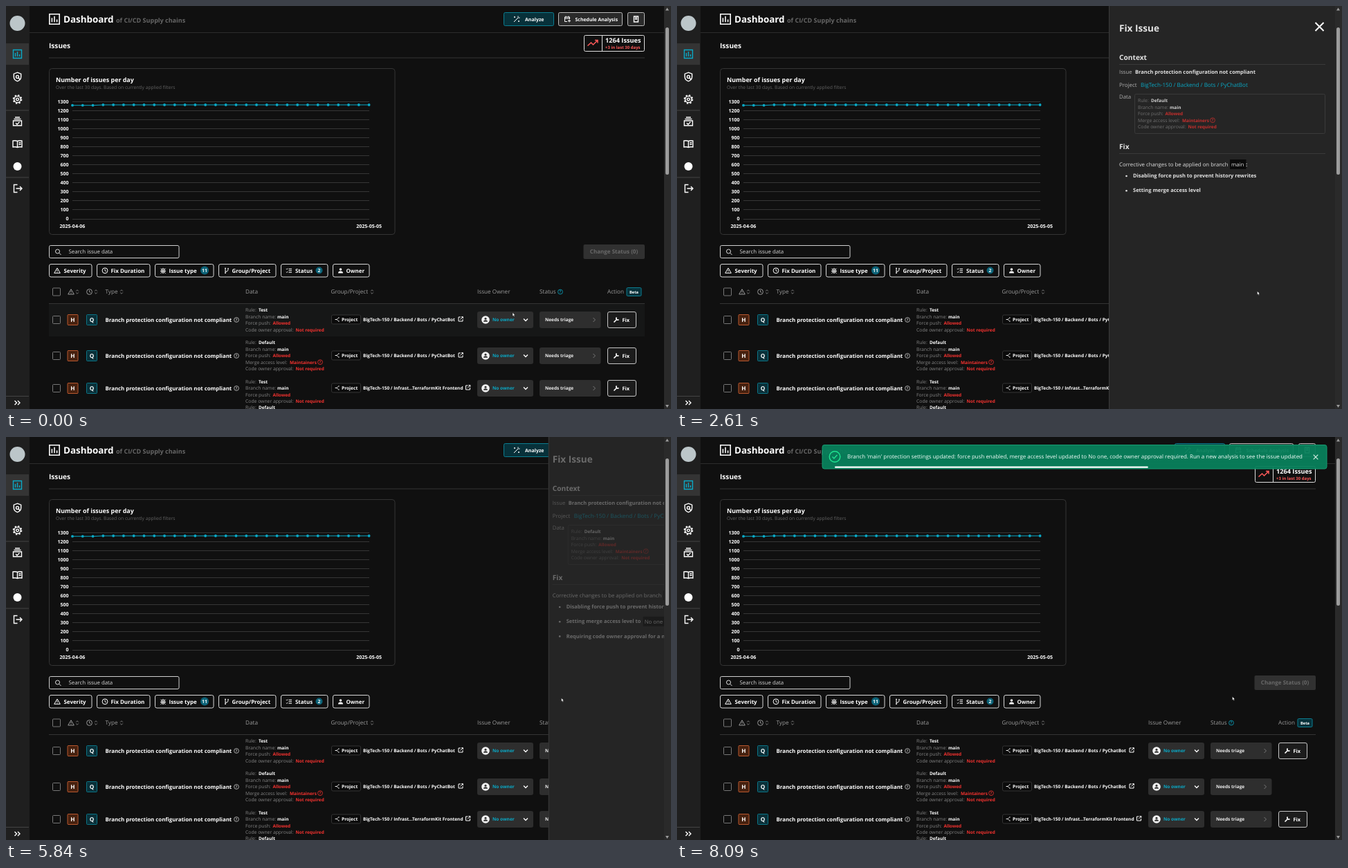
These frames come from a looping animation (961x583 px, 8.17 s). An HTML page:

```html
<!DOCTYPE html>
<html lang="en">
<head>
<meta charset="utf-8">
<title>Issue dashboard</title>
<style>
html, body { margin: 0; height: 100%; overflow: hidden; background: #101010; }
svg { display: block; width: 961px; height: 583px; font-family: "Open Sans", "Noto Sans", sans-serif; text-rendering: geometricPrecision; }
</style>
</head>
<body>
<svg id="stage" viewBox="0 0 961 583"></svg>
<script>
const TEAL = '#0aa9c6', RED = '#f3322f', GREY = '#858585', LINE = '#343434';

// Drawing helpers; text is centred vertically on y by its cap height.
const text = (x, y, s, size = 7, fill = '#fff', weight = 700, anchor = 'start', extra = '') =>
  `<text x="${x}" y="${y + size * .36}" font-size="${size}" fill="${fill}" font-weight="${weight}" text-anchor="${anchor}" ${extra}>${s}</text>`;
const rect = (x, y, w, h, fill = 'none', stroke = 'none', r = 0, extra = '') =>
  `<rect x="${x}" y="${y}" width="${w}" height="${h}" rx="${r}" fill="${fill}" stroke="${stroke}" ${extra}/>`;
const dot = (x, y, r, fill, extra = '') => `<circle cx="${x}" cy="${y}" r="${r}" fill="${fill}" ${extra}/>`;
const path = (d, stroke, width = 1, extra = '') => `<path d="${d}" stroke="${stroke}" stroke-width="${width}" fill="none" ${extra}/>`;
const hline = (x1, x2, y, color = LINE) => path(`M${x1} ${y}H${x2}`, color);
const group = (id, content, extra = '') => `<g id="${id}" ${extra}>${content}</g>`;
const ring = r => `M${-r} 0a${r} ${r} 0 1 0 ${2 * r} 0a${r} ${r} 0 1 0 ${-2 * r} 0`;

const shapes = {
  chart: 'M-6-6H6V6H-6ZM-3 3.5v-5M0 3.5v-7M3 3.5v-3',
  shield: 'M0-6.3L5.2-4.3V0C5.2 3.3 3 5.3 0 6.3C-3 5.3-5.2 3.3-5.2 0V-4.3Z' + ring(2) + 'M1.4 1.4l2 2',
  gear: ring(4.6) + ring(1.9),
  tasks: 'M-3.5-6h7M-5-3.5h10M-6-1H6V6H-6ZM-2.5 2.3l2 2 3.5-3.5',
  book: 'M0-4C-2-5-4-5-6.5-4.5V4.5C-4 4-2 4 0 5C2 4 4 4 6.5 4.5V-4.5C4-5 2-5 0-4V5M2-1.5l3-.5M2 1l3-.5',
  logout: 'M0-5.5h-5v11h5M-2 0h8M3.5-3l3 3-3 3',
  expand: 'M-4-3l3 3-3 3M.5-3l3 3-3 3',
  wand: 'M-4 4l6-6M2-4.5v2M4.5-2h-2M-3-4v2M-4-3h2M3 2v2M2 3h2',
  calendar: 'M-3.5-3h7v3M-3.5-3v6.5h3.500M-3.500-1h7M-2-4.500v2M2-4.500v2M1 2.500h4M3 .5v4',
  note: 'M-3-4h6v8h-6ZM-1.500-2h3M-1.500 0h3',
  search: 'M-4-1a3 3 0 1 0 6 0a3 3 0 1 0-6 0M1.2 1.2L4 4',
  warn: 'M0-3.8L4.3 3.5H-4.300ZM0-1.200v2M0 1.800v.8',
  clock: ring(3.9) + 'M0-2.300V0l1.800 1',
  bug: 'M-2-1a2 2 0 0 1 4 0v2.500a2 2 0 0 1-4 0ZM-4 .7h8M-3.500-3l1.500 1.500M3.500-3l-1.500 1.500M-3.500 4l1.500-1.500M3.500 4l-1.500-1.500M0-2v5',
  branch: 'M-2-3.500v7M-2 1.500c3 0 4-1 4-4M-3-3.500h2M-3 3.500h2M1-3h2',
  list: 'M-4-2.500l.8.8 1.200-1.500M-4 2l.8.8 1.200-1.500M-.5-2.500h4.500M-.5 0h4.500M-.5 2.500h4.500',
  sort: 'M-1.800-1L0-2.800 1.800-1M-1.800 1L0 2.800 1.800 1',
  link: 'M0-3h-3v6h6v-3M-.5.5L3.300-3.300M1-3.300h2.300v2.300',
  down: 'M-3-1.500L0 1.500 3-1.500',
  right: 'M-1.500-3L1.500 0-1.500 3',
  wrench: 'M-3.500 3.500L1-1M.5-3.500a2 2 0 1 0 3 3',
  nodes: 'M-2.500 0h2l2-2M-.5 0l2 2M-3.200 0h.4M1.600-2.500h1.500M1.600 2.500h1.500',
  trend: 'M-7.500 3.500l5-4.500 3 3 6-6M3-4.500h4v4',
  check: 'M-3.500 0l2.400 2.500L3.500-2.500',
  cross: 'M-1-1L1 1M1-1L-1 1',
};
const icon = (name, x, y, color = '#fff', width = 1, scale = 1) =>
  `<g transform="translate(${x} ${y}) scale(${scale})">${path(shapes[name], color, width)}</g>`;
const help = (x, y, color = '#ccc') => dot(x, y, 3.4, 'none', `stroke="${color}" stroke-width=".8"`) + text(x, y, '?', 5, color, 700, 'middle');
const person = (x, y, s, color) => dot(x, y - 1.8 * s, 1.8 * s, color) + `<path d="M${x - 3.5 * s} ${y + 3.7 * s}a${3.5 * s} ${3 * s} 0 0 1 ${7 * s} 0z" fill="${color}"/>`;

// Issue data lines: label, offset of the value, value, colour
const rule = name => ['Rule:', 19, name, '#fff'];
const main = ['Branch name:', 46, 'main', '#fff'];
const push = ['Force push:', 39.5, 'Allowed', RED];
const merge = ['Merge access level:', 64, 'Maintainers', RED];
const owner = ['Code owner approval:', 72.5, 'Not required', RED];
const testData = [rule('Test'), main, push, owner];
const fullData = [rule('Default'), main, push, merge, owner];
const dataLines = (x, y, lines) => lines.map(([label, dx, value, color], i) => {
  const ly = y + i * 9.4;
  return text(x, ly, label, 6.8, GREY, 400) + text(x + dx, ly, value, 6.45, color) + (label[0] == 'M' ? help(x + 108, ly, RED) : '');
}).join('');

const ISSUE = 'Branch protection configuration not compliant';
const REPO = 'BigTech-150 / Backend / Bots / PyChatBot';

function sidebar() {
  const items = [['shield', 102.5], ['gear', 135], ['tasks', 167], ['book', 199.5], ['logout', 264], ['expand', 574]];
  return rect(0, 0, 34, 583, '#1f1f1f') + rect(0, 54, 33, 31, '#343434') + dot(16.5, 25, 11, '#bcc6c9') +
    icon('chart', 16.5, 69.5, TEAL, 1.4) + dot(16.5, 232, 6, '#fff') +
    dot(16.5, 135, 5.8, 'none', 'stroke="#fff" stroke-width="2" stroke-dasharray="2.3 2.25"') +
    items.map(([name, y]) => icon(name, 16.5, y, '#fff', 1.4)).join('') +
    [151, 248, 564.5].map(y => hline(0, 33, y, '#444')).join('');
}

function header() {
  return icon('chart', 70, 19, '#fff', 1.3, 1.2) + text(83, 19.5, 'Dashboard', 13.4) +
    text(159, 21, 'of CI/CD Supply chains', 9, '#666') + hline(34, 951, 38.5, '#2c2c2c') +
    rect(719.5, 9.5, 72, 19, '#07313a', '#0b7d90', 2) + icon('wand', 738, 19) + text(750, 19, 'Analyze', 7.05) +
    rect(798.5, 9.5, 92, 19, '#2a2a2a', '#bbb', 2) + icon('calendar', 811, 19) + text(822.5, 19, 'Schedule Analysis', 6.95) +
    rect(898.5, 9.5, 24, 19, '#2a2a2a', '#bbb', 2) + icon('note', 910.5, 19, '#fff', 1.4) +
    text(62, 57.5, 'Issues', 10.1) + hline(62, 923, 75) +
    rect(835.5, 42.5, 87, 23, '#101010', '#ddd', 2) + path('M861.5 42V66', '#ddd') + icon('trend', 848, 54, '#ff5a5a', 1.5) +
    text(866, 50, '1264 Issues', 9.2) + text(866, 60, '+3 in last 30 days', 6, '#ff5a5a');
}

function chart() {
  const py = i => i < 3 ? 143.7 : 143, px = i => 96 + i * 14.78;
  let s = rect(62.5, 90.5, 499.5, 240, 'none', LINE, 4) + text(72, 106.5, 'Number of issues per day', 8.9) +
    text(72, 118, 'Over the last 30 days. Based on currently applied filters', 6.73, '#626262', 400);
  for (let i = 0; i <= 13; i++) {
    const y = 138 + i * 13.04;
    s += hline(96, 525, Math.round(y) + .5, '#363636') + text(90.500, y, 1300 - i * 100, 7, '#fff', 700, 'end');
  }
  const points = Array.from({ length: 30 }, (_, i) => [px(i), py(i)]);
  return s + path('M' + points.join('L'), TEAL) + points.map(([x, y]) => dot(x, y, 1.9, TEAL)).join('') +
    text(77.5, 318, '2025-04-06', 7.05) + text(543, 318, '2025-05-05', 7.05, '#fff', 700, 'end');
}

function filters() {
  const list = [[62, 62, 'Severity', 'warn', 83.5], [131, 77, 'Fix Duration', 'clock', 151.5], [215, 85, 'Issue type', 'bug', 235.5],
    [307, 83, 'Group/Project', 'branch', 326.5], [397, 68, 'Status', 'list', 418], [472, 53, 'Owner', '', 491.5]];
  const badge = (x, r, n) => dot(x, 382.5, r, '#0b6378') + text(x, 382.5, n, 6.8, '#fff', 700, 'middle');
  return rect(62.5, 346.5, 187.5, 18, 'none', '#d0d0d0', 2) + icon('search', 75.5, 356, '#ddd') +
    text(90.5, 355.5, 'Search issue data', 7.85, '#d6d6d6', 400) +
    rect(834.5, 345, 88.500, 21, '#313131', 'none', 2) + text(878.5, 355.5, 'Change Status (0)', 8, '#696969', 700, 'middle') +
    list.map(([x, w, label, name, tx]) => rect(x + .5, 373.5, w - .5, 18.5, 'none', '#d8d8d8', 2.5) +
      (name ? icon(name, x + 12, 382.8) : person(x + 11.5, 382.8, 1, '#fff')) + text(tx, 382.8, label, 7.95)).join('') +
    badge(287, 6, 11) + badge(452.5, 5, 2);
}

const checkbox = y => rect(67.5, y - 5.5, 11, 11, 'none', '#777', 1);

function tableHead() {
  const y = 413.5, cols = [[143.5, 'Type'], [346, 'Data'], [469.5, 'Group/Project'], [681, 'Issue Owner'], [771, 'Status'], [869, 'Action']];
  return checkbox(y) + cols.map(([x, s]) => text(x, y, s, 8.2, '#9a9a9a', 400)).join('') +
    icon('warn', 94, y, '#9a9a9a') + icon('clock', 120.5, y, '#9a9a9a') +
    [103, 130, 167, 529].map(x => icon('sort', x, y, '#8a8a8a', .9)).join('') + help(801, y, TEAL) +
    rect(897, 407.500, 21, 12, '#07313a', '#0b7d90', 1.5) + text(907.5, y, 'Beta', 5.7, '#fff', 700, 'middle') + hline(62, 923, 430.5);
}

function row(y, top, lines, project, linkX, id) {
  const tag = (x, letter, fill, stroke) => rect(x, y - 7.5, 15, 15, fill, stroke, 1) + text(x + 7.5, y, letter, 8.2, '#fff', 700, 'middle');
  return checkbox(y) + tag(89, 'H', '#46210f', '#b9582f') + tag(116.5, 'Q', '#0a3039', '#0b7486') +
    text(143.5, y, ISSUE, 7.83) + help(333, y) + dataLines(346, top, lines) +
    rect(470.5, y - 7, 42, 13, '#0b0b0b', '#343434', 2) + icon('nodes', 478.5, y - .5) + text(485, y - .5, 'Project', 6.6) +
    text(516, y - .5, project, 6.53) + icon('link', linkX, y - 1) +
    rect(681, y - 12, 81, 24, '#2e2e2e', 'none', 3) + dot(693, y, 5.8, '#f2f2f2') + person(693, y - .3, .85, '#333') +
    text(703, y, 'No owner', 6.55, TEAL) + icon('down', 751, y, '#fff', 1.3) +
    rect(771, y - 12, 88.5, 24, '#2e2e2e', 'none', 3) + text(779, y, 'Needs triage', 6.5, '#eee') + icon('right', 850, y, '#777') +
    group(id, rect(869.5, y - 11.5, 41, 23, '#1c1c1c', '#c4c4c4', 2.5) + icon('wrench', 882, y, '#fff', 1.6) + text(890.5, y, 'Fix', 7.4));
}

const bullets = ['Disabling force push to prevent history rewrites', 'Setting merge access level to',
  'Requiring code owner approval for a more robust review process'];

function panel() {
  const ink = '#e2e2e2', code = (x, y, w, s) => rect(x, y - 7, w, 14, '#0a0a0a') + text(x + 2, y, s, 7.8, ink, 400);
  const content = text(639, 32, 'Fix Issue', 13.6, ink) + icon('cross', 928.5, 30, '#fff', .33, 6) +
    text(639, 74, 'Context', 10.2, ink) + hline(639, 937, 84.5, '#3a3a3a') +
    text(639, 95.5, 'Issue', 7.7, '#b0b0b0', 400) + text(662, 95.5, ISSUE, 7.46, ink) +
    text(639, 114.5, 'Project', 7.9, '#b0b0b0', 400) + text(670, 114.5, REPO, 8.07, TEAL, 400) +
    text(639, 131.5, 'Data', 7.8, '#b0b0b0', 400) + rect(661.5, 127.5, 275, 57, 'none', '#3a3a3a', 2) +
    group('panelData', dataLines(666, 137, fullData), 'opacity=".78"') +
    text(639, 203, 'Fix', 10.2, ink) + hline(639, 937, 213.5, '#3a3a3a') +
    group('thinking', group('spinner', dot(0, 0, 3.3, 'none', 'stroke="#aaa" stroke-width="1.3" stroke-dasharray="1.6 1"')) +
      text(651.5, 229, 'Thinking...', 7.3, '#c4c4c4')) +
    group('intro', text(639, 229, 'Corrective changes to be applied on branch', 7.8, ink, 400) + code(799, 229, 23.5, 'main') + text(822, 229, ':', 7.8, ink)) +
    bullets.map((s, i) => group('dot' + i, dot(649.5, 246 + i * 21.2, 1.3, ink)) +
      text(659, 245.5 + i * 21.2, '', 7.5, ink, 700, 'start', `id="bullet${i}"`)).join('') +
    group('noOne', code(770, 266.8, 31.5, 'No one')) +
    group('accept', rect(880, 303, 57, 21.5, '#05aed0', 'none', 2.5) + icon('check', 892.5, 314, '#fff', 1.4) + text(901, 314, 'Accept', 7.85));
  return group('panel', rect(624, 0, 420, 583, '#252525') + path('M624.5 0V583', '#3a3a3a')) + group('content', content) +
    group('hbar', rect(640, 575, 311, 8, '#ededed') + rect(651, 576.5, 299, 5, '#858585', 'none', 2.5) + '<path d="M647 576.5v5l-3-2.500z" fill="#777"/>');
}

function toast() {
  return group('toast', rect(210, 11.500, 729, 34.5, '#08805b', '#169a70', 3, 'fill-opacity=".95"') +
    dot(228, 28.5, 7.8, 'none', 'stroke="#1fe391" stroke-width="1.4"') + icon('check', 228, 28.5, '#1fe391', 1.4) +
    text(246, 28, "Branch 'main' protection settings updated: force push enabled, merge access level updated to No one, code owner approval required. Run a new analysis to see the issue updated", 7.96, '#f4fffa', 400) +
    icon('cross', 923, 29, '#d8eee5', .35, 3.3) + rect(228, 42.500, 711, 2.2, '#fff', 'none', 1, 'id="progress"'));
}

const scrollbar = rect(951, 0, 10, 583, '#2a2a2a') + rect(953, 31, 5, 213, '#9c9c9c', 'none', 2.5) +
  '<path d="M953 6.500h5l-2.500-4zM953 577h5l-2.500 4z" fill="#9c9c9c"/>';
const cursor = group('cursor',
  group('arrow', '<path d="M0 0V5.200L1.200 4.200 2.200 6 3 5.500 2.200 3.800H3.700Z"/>') +
  group('hand', '<path d="M.6.6Q1.500-.3 2 .8V3.200L4.300 3.800Q5 4 4.800 5.200L4.200 8H1.400L-.6 5Q-.3 4 .7 4.800Z"/>'),
  'fill="#fff" stroke="#000" stroke-width=".4"');

stage.innerHTML = rect(0, 0, 961, 583, '#101010') +
  rect(62, 431, 861, 47, '#161717', 'none', 0, 'id="hover1"') + rect(62, 478, 861, 56, '#161717', 'none', 0, 'id="hover2"') +
  rect(62, 478, 861, 56, '#222625', 'none', 0, 'id="chosen"') +
  sidebar() + header() + chart() + filters() + tableHead() +
  row(454, 440, testData, REPO, 657, 'fix1') + row(506, 487, fullData, REPO, 657, 'fix2') +
  row(553, 543.500, testData, 'BigTech-150 / Infrast...TerraformKit Frontend', 667.500, 'fix3') +
  dataLines(346, 581, [rule('Default')]) + panel() + toast() + scrollbar + cursor;

const $ = id => document.getElementById(id);
const clamp = u => Math.min(1, Math.max(0, u));
const ramp = (t, a, b) => clamp((t - a) / (b - a));
const smooth = u => u * u * (3 - 2 * u);
const easeOut = u => 1 - (1 - u) ** 3;
const show = (id, opacity) => $(id).setAttribute('opacity', +opacity);
const move = (id, x, y = 0, more = '') => $(id).setAttribute('transform', `translate(${x} ${y}) ${more}`);

// Keys are [time, ...values]
function track(t, keys, ease) {
  let i = 1;
  while (i < keys.length - 1 && t > keys[i][0]) i++;
  const [a, b] = [keys[i - 1], keys[i]], u = ease(ramp(t, a[0], b[0]));
  return a.slice(1).map((v, k) => v + (b[k + 1] - v) * u);
}

const PANEL = 327, LOOP = 8170;
const cursorKeys = [[40, 732, 443.500], [860, 776, 507], [1120, 886, 506], [1250, 881, 509], [1900, 881, 509], [2430, 838.5, 412.5],
  [3680, 838.5, 412.5], [4490, 891, 325], [4650, 891.5, 318.5], [4800, 891.5, 318.5], [5590, 802.5, 377.5], [6530, 802.5, 377.5], [7300, 802.5, 375.5]];
const toastKeys = [[5819, 1710], [6239, -11], [6344, 6], [6449, -3], [6519, 0]];

function draw(t) {
  const [cx, cy] = track(t, cursorKeys, smooth);
  move('cursor', cx, cy);
  const hand = (t > 1000 && t < 2100) || (t > 4450 && t < 4980);
  show('hand', hand);
  show('arrow', !hand);
  show('hover1', cy < 478 && t < 1000);
  show('hover2', cy >= 478 && t < 1660);
  show('chosen', t < 1650 ? 0 : 1 - ramp(t, 1950, 2200));
  show('fix2', t < 5600);

  const opening = t < 4000;
  const dx = PANEL * (opening ? 1 - easeOut(ramp(t, 1640, 1924)) : smooth(ramp(t, 5644, 6044)));
  move('panel', dx);
  move('content', dx * (opening ? 1.15 : .943));
  show('panel', dx < PANEL);
  show('content', (1 - dx / PANEL) ** 1.5);
  show('hbar', opening && dx > .5 && dx < 40);
  show('thinking', t < 2260);
  move('spinner', 661, 229, `rotate(${t * .36})`);
  move('thinking', 0);
  $('thinking').querySelector('text').setAttribute('x', 670);
  show('intro', ramp(t, 2260, 2420));

  let [left] = track(t, [[2460, 0], [2610, 74], [2950, 140]], u => u);
  bullets.forEach((s, i) => {
    $('bullet' + i).textContent = s.slice(0, Math.max(0, Math.floor(left)));
    show('dot' + i, left > 0);
    left -= s.length;
    if (i == 1) show('noOne', left > 0);
  });
  show('accept', ramp(t, 3150, 3390));

  move('toast', track(t, toastKeys, easeOut)[0]);
  show('toast', t > 5819);
  $('progress').setAttribute('width', Math.min(711, 570 - .154 * (t - 7330)));
}

function frame(now) {
  draw(now % LOOP);
  requestAnimationFrame(frame);
}
draw(0);
requestAnimationFrame(frame);
</script>
</body>
</html>
```
